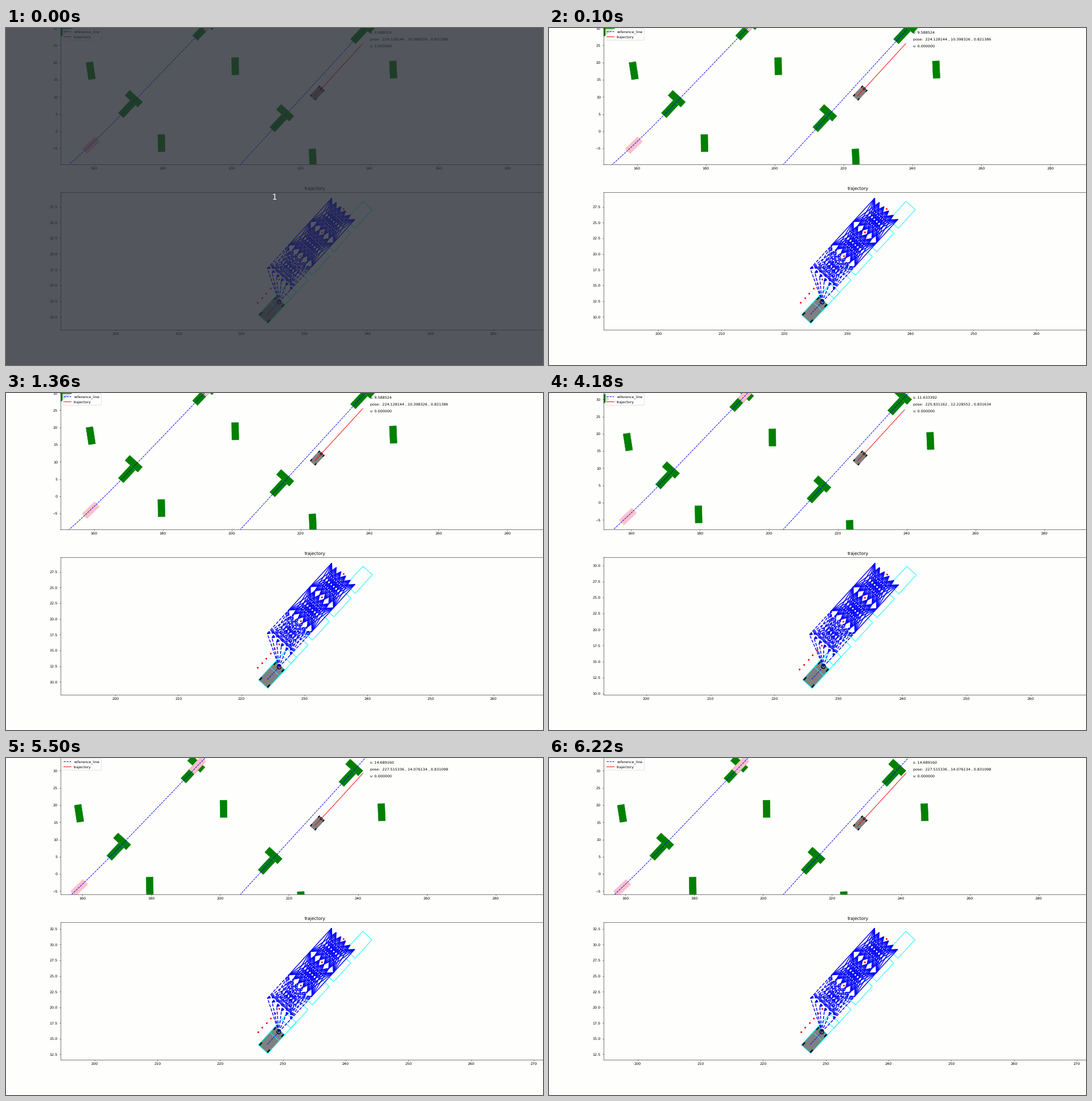
Animation of 944x593 px, one loop 6700 ms. Source, as a matplotlib script:

```python
import numpy as np
import matplotlib.pyplot as plt
from matplotlib.animation import FuncAnimation
from matplotlib.collections import LineCollection
from matplotlib.patches import Circle, Polygon, Rectangle
from matplotlib.ticker import MultipleLocator

W, H, DPI = 944, 593, 100
K = 0.462                 # scale of all point sizes
LW = 1.5 * K
STEP_MS, LOOP_MS = 100, 6700

plt.rcParams.update({
    "font.family": "DejaVu Sans", "font.size": 10 * K, "text.hinting": "none",
    "axes.titlesize": 12 * K, "axes.titlepad": 6 * K, "axes.linewidth": 0.8 * K,
    "lines.linewidth": LW, "patch.linewidth": K,
    "xtick.major.size": 3.5 * K, "ytick.major.size": 3.5 * K,
    "xtick.major.width": 0.8 * K, "ytick.major.width": 0.8 * K,
    "xtick.major.pad": 3.5 * K, "ytick.major.pad": 3.5 * K,
})

# Axes geometry in pixels
LEFT, WIDTH, HEIGHT = 95.5, 895, 242.2
MAP_BOTTOM, PLAN_BOTTOM = 240, 530.7

# start ms, travelled distance s, pose (x, y, heading)
STATES = [
    (0, 9.588524, (224.128144, 10.398326, 0.821386)),
    (2200, 11.633392, (225.831162, 12.228552, 0.831634)),
    (5500, 14.689160, (227.515336, 14.076134, 0.831098)),
]

# Right-hand road: a straight line, measured by distance from ROAD_START
ROAD_START = np.array([219.48, 8.94])
ROAD_ANGLE = 0.83
AHEAD = np.array([np.cos(ROAD_ANGLE), np.sin(ROAD_ANGLE)])
ASIDE = np.array([-AHEAD[1], AHEAD[0]])

WHEELBASE = 2.7
DOT_GAP, ROW_GAP = 1.01, 5.04
OFFSETS = np.arange(-2.5, 2.6)

# Parked cars: x, y, heading in degrees; crossings are T-shaped pairs
PARKED = [(159.05, 17.63, 98.7), (201.0, 18.94, 91), (179.57, -3.42, 91),
          (246.87, 17.95, 92.5), (223.5, -7.62, 92.5), (151.0, 29.32, 37)]
CROSSINGS = [(169.52, 6.47), (191.05, 28.95), (213.48, 2.37), (236.92, 27.95)]
BAR_SHIFT = (2.02, 3.02)
PINK = [(159.07, -4.02, 44), (193.46, 31.6, 47)]


def road(s):
    return ROAD_START + np.outer(s, AHEAD)


def left_road(x):
    bend = np.clip(169.5 - x, 0, None)
    return 6.5 + 1.042 * (x - 169.5) + 0.0045 * bend ** 2


def box(x, y, angle, back=-2.5, front=2.5, half=1, mid=0):
    """Corners of a rectangle around a pose; mid shifts it sideways."""
    c, s = np.cos(angle), np.sin(angle)
    local = np.array([(back, mid - half), (front, mid - half),
                      (front, mid + half), (back, mid + half)])
    return local @ np.array([[c, s], [-s, c]]) + (x, y)


def add_box(ax, corners, z, color):
    ax.add_patch(Polygon(corners, color=color, zorder=z))


def obstacles():
    cars = list(PARKED)
    for x, y in CROSSINGS:
        cars += [(x, y, 47), (x + BAR_SHIFT[0], y + BAR_SHIFT[1], 137.5)]
    return cars


def front_point(pose):
    x, y, a = pose
    return np.array([x + WHEELBASE * np.cos(a), y + WHEELBASE * np.sin(a)])


def draw_car(ax, pose, ring):
    add_box(ax, box(*pose, -1, 3), 3, "gray")
    for along in (-0.65, WHEELBASE):
        for side in (-0.88, 0.88):
            wheel = box(*pose, along - 0.27, along + 0.27, 0.1, side)
            add_box(ax, wheel, 4, "black")
    ax.add_patch(Circle(front_point(pose), 0.31, fill=False, ec="black",
                        lw=ring, zorder=9))


def make_axes(bottom, label, x_step, y_step):
    ax = fig.add_axes([LEFT / W, 1 - bottom / H, WIDTH / W, HEIGHT / H],
                      label=label, facecolor="none")
    ax.xaxis.set_major_locator(MultipleLocator(x_step))
    ax.yaxis.set_major_locator(MultipleLocator(y_step))
    return ax


def draw_map(ax, s, pose, path):
    x, y, a = pose
    half = 20 * WIDTH / HEIGHT
    for cars, color, z in ((obstacles(), "green", 1), (PINK, "pink", 1.5)):
        for cx, cy, deg in cars:
            add_box(ax, box(cx, cy, np.radians(deg)), z, color)
    xs = np.linspace(150, 198, 60)
    ax.plot(xs, left_road(xs), "b--", label="reference_line")
    ax.plot(*road([-28, 36]).T, "b--")
    draw_car(ax, pose, LW)
    ax.plot(*path.T, "r-", label="trajectory", zorder=5)
    lines = (f"s: {s:.6f}", f"pose:  {x:.6f} , {y:.6f} , {a:.6f}", "v: 0.000000")
    for i, line in enumerate(lines):
        ax.text(x + 16.02, y + 17.95 - 1.98 * i, line, zorder=10)
    ax.legend(loc="upper left")
    ax.set(xlim=(x - half, x + half), ylim=(y - 20, y + 20))


def draw_plan(ax, s, pose, rows, path):
    ax.set_title("trajectory")
    draw_car(ax, pose, 1.3 * LW)
    for i, (px, py) in enumerate(path):
        angle = pose[2] if i < 2 else ROAD_ANGLE
        ax.add_patch(Polygon(box(px, py, angle, -1, 3), fill=False, ec="cyan",
                             lw=LW, zorder=5))

    near_dots = s - DOT_GAP * np.arange(5, 0, -1)
    far_dots = s + ROW_GAP * np.arange(4)
    dots = road(np.concatenate([near_dots, far_dots]))
    ax.plot(*dots.T, "ro", ms=3 * 0.72, mew=0, zorder=6)

    ax.plot(*path[:2].T, "b--", zorder=7)
    layers = [path[1:2]] + rows
    for i, (near, far) in enumerate(zip(layers, layers[1:])):
        links = [(p, q) for p in near for q in far]
        ax.add_collection(LineCollection(
            links, colors="blue", linewidths=1.5 * LW, zorder=7,
            linestyles="--" if i < 2 else "-"))
    ax.axis("equal")


def build(i, s, pose):
    rows = [road(s + ROW_GAP * k) + np.outer(OFFSETS, ASIDE) for k in range(4)]
    path = np.array([pose[:2], front_point(pose)] + [row[0] for row in rows])
    top = make_axes(MAP_BOTTOM, f"map{i}", 20, 5)
    low = make_axes(PLAN_BOTTOM, f"plan{i}", 10, 2.5)
    draw_map(top, s, pose, path)
    draw_plan(low, s, pose, rows, path)
    return top, low


fig = plt.figure(figsize=(W / DPI, H / DPI), dpi=DPI, facecolor="#fefefd")
scenes = [build(i, s, pose) for i, (_, s, pose) in enumerate(STATES)]

cover = fig.add_axes([0, 0, 1, 1], label="cover", zorder=20)
cover.axis("off")
cover.add_patch(Rectangle((0, 0), 1, 1, fc="#282c34", ec="none", alpha=0.8))
cover.text(471.8 / W, 1 - 302 / H, "1", color="white", ha="center",
           va="baseline", fontsize=13.5 * 0.72)


def update(n):
    ms = n * STEP_MS
    current = sum(ms >= state[0] for state in STATES) - 1
    for i, pair in enumerate(scenes):
        for ax in pair:
            ax.set_visible(i == current)
    cover.set_visible(n == 0)
    return []


anim = FuncAnimation(fig, update, frames=LOOP_MS // STEP_MS, interval=STEP_MS,
                     init_func=lambda: update(0), repeat=True, repeat_delay=0,
                     blit=False)
plt.show()
```
